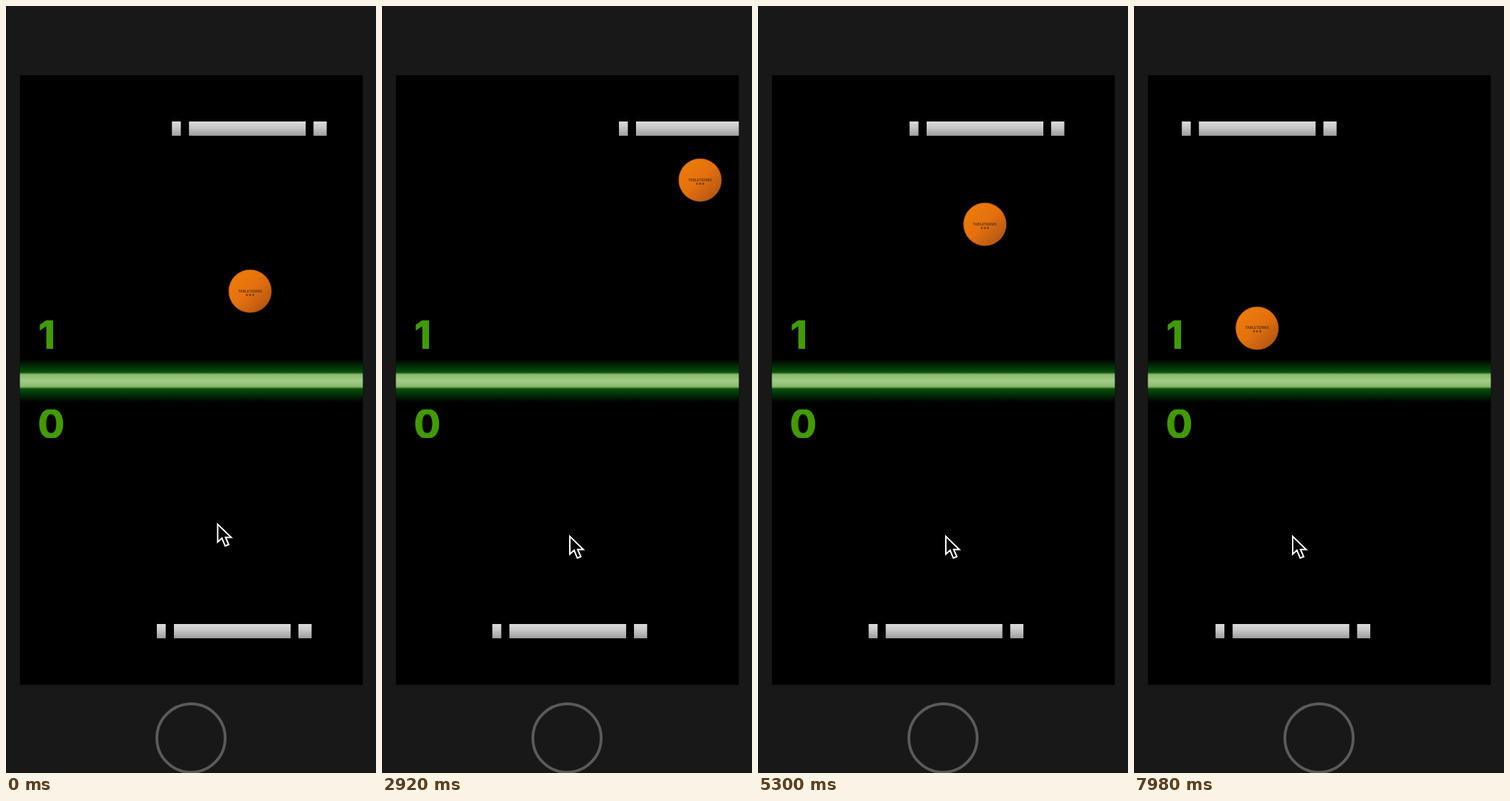
Recreate the animation shown at these times as an HTML page. Size 520 by 1076 pixels, loop 8 s.

```html
<!DOCTYPE html>
<html lang="en">
<head>
<meta charset="utf-8">
<title>Pong</title>
<style>
  html, body { margin: 0; width: 100%; height: 100%; overflow: hidden; background: #181818; }
  svg { display: block; width: 520px; height: 1076px; }
  .score { font: 800 55px Inter, "Open Sans", sans-serif; fill: #419b05; }
  .label { font: 700 4.8px "Liberation Sans", sans-serif; fill: #60370f; text-anchor: middle; }
</style>
</head>
<body>
<svg viewBox="0 0 520 1076">
  <defs>
    <linearGradient id="metal" x2="0" y2="1">
      <stop offset="0" stop-color="#dcdcdc"/>
      <stop offset=".4" stop-color="#c9c9c9"/>
      <stop offset="1" stop-color="#9e9e9e"/>
    </linearGradient>
    <linearGradient id="beam" x2="0" y2="1">
      <stop offset="0" stop-color="#000"/>
      <stop offset=".12" stop-color="#021f04"/>
      <stop offset=".31" stop-color="#07500c"/>
      <stop offset=".36" stop-color="#8aba68"/>
      <stop offset=".5" stop-color="#a4cb88"/>
      <stop offset=".64" stop-color="#8aba68"/>
      <stop offset=".69" stop-color="#07500c"/>
      <stop offset=".88" stop-color="#021f04"/>
      <stop offset="1" stop-color="#000"/>
    </linearGradient>
    <linearGradient id="orange" x1=".1" y1=".1" x2=".9" y2=".9">
      <stop offset="0" stop-color="#ee7d08"/>
      <stop offset=".5" stop-color="#e4700e"/>
      <stop offset="1" stop-color="#b25414"/>
    </linearGradient>
    <clipPath id="screen"><rect x="19.5" y="97" width="482" height="855.5"/></clipPath>
    <clipPath id="digit"><rect x="40" y="566" width="50" height="40"/></clipPath>
    <g id="paddle" fill="url(#metal)">
      <rect width="12.5" height="20"/>
      <rect x="24" width="164" height="20"/>
      <rect x="199" width="18.5" height="20"/>
    </g>
  </defs>

  <rect x="19.5" y="97" width="482" height="855.5"/>
  <circle cx="260" cy="1027" r="48" fill="none" stroke="#5a5a5a" stroke-width="4"/>

  <g clip-path="url(#screen)">
    <rect x="19" y="495" width="483" height="61" fill="url(#beam)"/>
    <text class="score" x="45" y="481">1</text>
    <text class="score" x="44.5" y="606" clip-path="url(#digit)">0</text>
    <use id="rival" href="#paddle"/>
    <use id="player" href="#paddle"/>
    <g id="ball">
      <circle r="30" fill="url(#orange)" stroke="#a8540c" stroke-width=".8"/>
      <text class="label" y="1.5">TABLETENNIS</text>
      <text class="label" y="6.5">★★★</text>
    </g>
    <path id="cursor" d="M.5 2V27L6.5 21.5L11 32.5L16 30.5L11.5 20.5H19.5Z"
          fill="#000" stroke="#fff" stroke-width="2"/>
  </g>
</svg>
<script>
const LOOP = 8000;
const SPEED = 2.514;               // ball pixels per step, on each axis
const WALL = 472.95, CEILING = 211.05;
const RIVAL_LIMIT = 441.5;
const PLAYER_LAG = 184;

// Bursts of picture updates: start, end, number of steps
const bursts = [[20, 820, 17], [840, 1560, 17]];
for (let start = 1660; start < 7540; start += 840) bursts.push([start, start + 740, 18]);
bursts.push([7540, 7980, 11]);

const ticks = [0];
for (const [start, end, count] of bursts)
  for (let k = 0; k < count; k++)
    ticks.push(start + 20 * Math.round((end - start) * k / (count - 1) / 20));

// Pointer keys: time, x, y, horizontal speed per ms
const pointerKeys = [
  [0, 297, 725, -0.125],
  [1800, 207, 721, -0.02],
  [2760, 263.5, 742, 0],
  [5300, 263.5, 742, 0],
  [6840, 238, 742, -0.0136],
  [7840, 222.5, 742, 0],
  [8000, 222.5, 742, 0]
];

function pointerAt(time) {
  if (time < 0) return { x: 297 - 0.125 * time, y: 725 };
  const i = Math.max(1, pointerKeys.findIndex(key => key[0] >= time));
  const [t0, x0, y0, v0] = pointerKeys[i - 1];
  const [t1, x1, y1, v1] = pointerKeys[i];
  const span = t1 - t0, s = (time - t0) / span, ease = s * s * (3 - 2 * s);
  return {
    x: x0 + (x1 - x0) * ease + span * s * (1 - s) * (v0 * (1 - s) - v1 * s),
    y: y0 + (y1 - y0) * ease
  };
}

const ballX = step => WALL - Math.abs(WALL - 343 - SPEED * step);
const ballY = step => CEILING + Math.abs(400 - CEILING - SPEED * step);

const [rival, player, ball, cursor] =
  ["rival", "player", "ball", "cursor"].map(id => document.getElementById(id));
const place = (node, x, y) => node.setAttribute("transform", `translate(${x} ${y})`);

function draw(time) {
  let step = ticks.length - 1;
  while (ticks[step] > time) step--;
  const now = ticks[step];
  const pointer = pointerAt(now);
  const follow = Math.min(RIVAL_LIMIT, ballX(step - 0.8) + 0.7);

  place(ball, ballX(step), ballY(step));
  place(rival, follow - 108.5, 162);
  place(player, pointerAt(now - PLAYER_LAG).x - 108, 867);
  place(cursor, pointer.x, pointer.y);
}

const begin = performance.now();
function frame() {
  draw((performance.now() - begin) % LOOP);
  requestAnimationFrame(frame);
}
draw(0);
requestAnimationFrame(frame);
</script>
</body>
</html>
```
